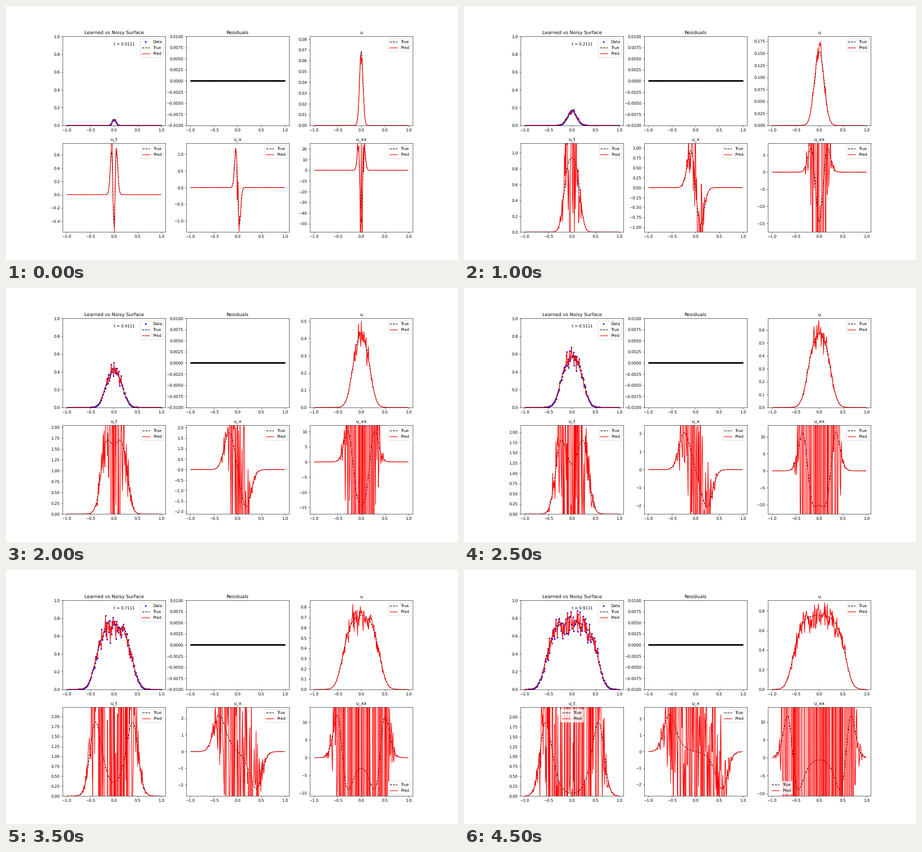
Animation of 998x561 px, one loop 5 s. Source, as a matplotlib script:

```python
import numpy as np
import matplotlib.pyplot as plt
from matplotlib.animation import FuncAnimation

W, H, DPI = 998, 561, 62.375
DX, DT = 0.01, 1 / 90
STEPS = 92
D, RATE, CROWD = 0.02, 10.0, 13.11
plt.rcParams["text.hinting"] = "none"


def solve():
    """Logistic growth with diffusion: u_t = D u_xx + u (RATE - CROWD u)."""
    grid = np.linspace(-1.5, 1.5, 601)
    h, sub = DX / 2, 40
    dt = DT / sub
    u = 0.0763 * np.exp(-grid**2 / (2 * 0.00087))
    rows = []
    for _ in range(STEPS):
        rows.append(u[102:499:2].copy())
        for _ in range(sub):
            lap = np.zeros_like(u)
            lap[1:-1] = (u[2:] - 2 * u[1:-1] + u[:-2]) / h**2
            u = u + dt * (D * lap + u * (RATE - CROWD * u))
    return np.array(rows)


def derivatives(u):
    ux = np.gradient(u, DX, axis=1)
    return u, np.gradient(u, DT, axis=0), ux, np.gradient(ux, DX, axis=1)


x = np.linspace(-0.99, 0.99, 199)
clean = solve()
noise = np.random.default_rng(3).standard_normal(clean.shape)
noisy = clean + 0.105 * clean**1.1 * noise
true, pred = derivatives(clean), derivatives(noisy)

fig, axes = plt.subplots(2, 3, figsize=(W / DPI, H / DPI + 1e-9), dpi=DPI)
fit_ax, res_ax, *panels = axes.flat
names = ("u", "u_t", "u_x", "u_xx")


def add_pair(ax):
    black, = ax.plot(x, 0 * x, "k--", label="True")
    red, = ax.plot(x, 0 * x, "r", label="Pred")
    return black, red


def legend_spot(name, k):
    """Legends leave the upper right corner once the curves reach it."""
    if name == "u_t" and k >= 8:
        return "upper left" if k == 8 else "upper center"
    if name == "u_xx" and k >= 6:
        return ("upper left", "lower right", "lower left")[min(k - 6, 2)]
    return "upper right"


fit_ax.set_title("Learned vs Noisy Surface")
dots, = fit_ax.plot(x, 0 * x, "b.", label="Data", snap=False)
fit_pair = add_pair(fit_ax)
fit_ax.set_ylim(0, 1)
clock = fit_ax.text(0, 0.9, "")
fit_ax.legend(loc="upper right")

res_ax.set_title("Residuals")
res_ax.plot(x, 0 * x, "k.", snap=False)
res_ax.set_ylim(-0.01, 0.01)

pairs = []
for ax, name in zip(panels, names):
    ax.set_title(name)
    pairs.append(add_pair(ax))


def draw(k):
    n = 1 + 9 * k
    dots.set_ydata(noisy[n])
    fit_pair[0].set_ydata(clean[n])
    fit_pair[1].set_ydata(noisy[n])
    clock.set_text(f"t = {n * DT:.4f}")
    for ax, name, (black, red), exact, fitted in zip(
            panels, names, pairs, true, pred):
        black.set_ydata(exact[n])
        red.set_ydata(fitted[n])
        ax.set_ylim(1.2 * min(exact[n].min(), 0), 1.2 * exact[n].max())
        ax.legend(loc=legend_spot(name, k))
    return []


anim = FuncAnimation(fig, draw, frames=10, interval=500,
                     init_func=lambda: draw(0), repeat=True, repeat_delay=0)
plt.show()
```
